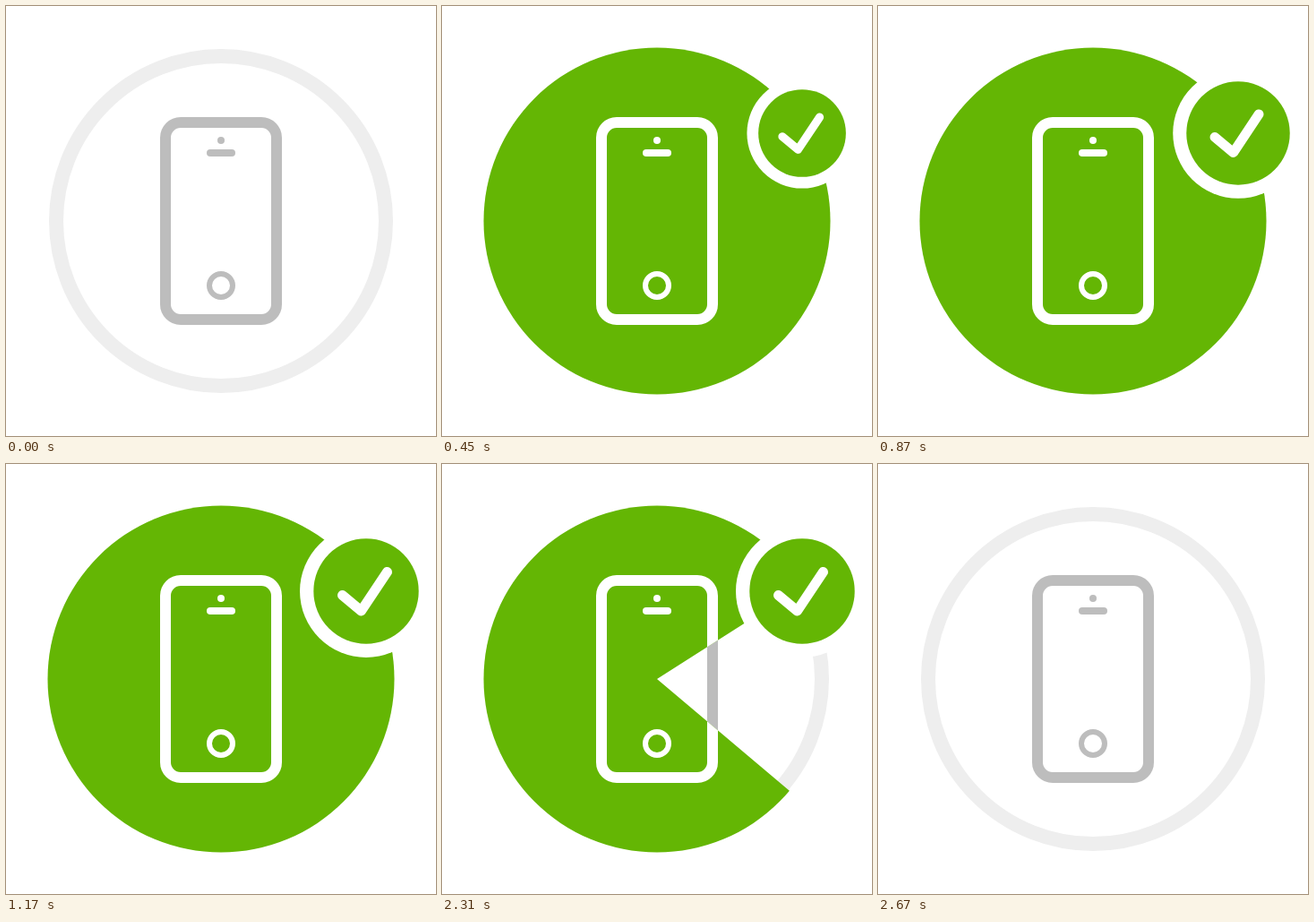
Recreate the animation shown at these times as an HTML page. Size 480 px wide and 480 px high, loop 3600 ms.

```html
<!DOCTYPE html>
<html lang="en">
<head>
<meta charset="utf-8">
<title>Phone confirmed</title>
<style>
  html, body { margin: 0; width: 100%; height: 100%; overflow: hidden; background: #fff; }
  svg { display: block; width: 100vw; height: 100vh; }
</style>
</head>
<body>
<svg viewBox="0 0 480 480">
  <defs>
    <clipPath id="slice"><path id="pie" d=""/></clipPath>
    <g id="phone">
      <rect x="178" y="130" width="124" height="220" rx="17" fill="none" stroke="currentColor" stroke-width="12"/>
      <circle cx="240" cy="150" r="4" fill="currentColor"/>
      <path d="M228 164H252" stroke="currentColor" stroke-width="8" stroke-linecap="round"/>
      <circle cx="240" cy="312" r="13" fill="none" stroke="currentColor" stroke-width="6"/>
    </g>
  </defs>
  <circle cx="240" cy="240" r="184" fill="none" stroke="#eee" stroke-width="16"/>
  <use href="#phone" color="#bdbdbd"/>
  <g clip-path="url(#slice)">
    <circle cx="240" cy="240" r="193.5" fill="#64b604"/>
    <use href="#phone" color="#fff"/>
  </g>
  <g id="badge">
    <circle r="74" fill="#fff"/>
    <circle r="58.7" fill="#64b604"/>
    <path d="M-26.5 4.5L-5.5 22L23.5 -21.5" fill="none" stroke="#fff" stroke-width="11" stroke-linecap="round" stroke-linejoin="round"/>
  </g>
</svg>
<script>
  const LOOP = 3600, STEP = 30;
  const SEAM = 57.5; // closing angle, behind the badge
  const pie = document.getElementById('pie');
  const badge = document.getElementById('badge');

  const part = (t, start, length) => Math.min(1, Math.max(0, (t - start) / length));
  const cubicIn = p => p ** 3;
  const cubicOut = p => 1 - (1 - p) ** 3;
  const backIn = (p, s = 3) => p * p * ((s + 1) * p - s);
  const elasticOut = p => p <= 0 ? 0 : p >= 1 ? 1
    : 1 + 2 ** (-10 * p) * Math.sin((p - 0.075) * 2 * Math.PI / 0.3);

  // Clockwise slice; angles in degrees from the top
  function slice(from, to) {
    const span = to - from;
    if (span < 0.05) return '';
    if (span > 359.95) return 'M0 0H480V480H0Z';
    const at = deg => {
      const a = deg * Math.PI / 180;
      return (240 + 300 * Math.sin(a)).toFixed(2) + ' ' + (240 - 300 * Math.cos(a)).toFixed(2);
    };
    return `M240 240L${at(from)}A300 300 0 ${span > 180 ? 1 : 0} 1 ${at(to)}Z`;
  }

  function draw(t) {
    const fill = 360 * cubicOut(part(t, 0, 414));
    const wipe = 360 * cubicIn(part(t, 2100, 358));
    pie.setAttribute('d', wipe > 0 ? slice(SEAM + wipe, SEAM + 360) : slice(0, fill));

    const size = t < 2100
      ? elasticOut(part(t, 400, 800))
      : 1 - backIn(part(t, 2352, 300));
    badge.setAttribute('display', size > 0.001 ? 'inline' : 'none');
    badge.setAttribute('transform', `translate(402 142) scale(${Math.max(size, 0.001).toFixed(4)})`);
  }

  let begin = null;
  function tick(now) {
    if (begin === null) begin = now;
    const t = (now - begin) % LOOP;
    draw(Math.floor(t / STEP + 0.01) * STEP);
    requestAnimationFrame(tick);
  }
  draw(0);
  requestAnimationFrame(tick);
</script>
</body>
</html>
```
